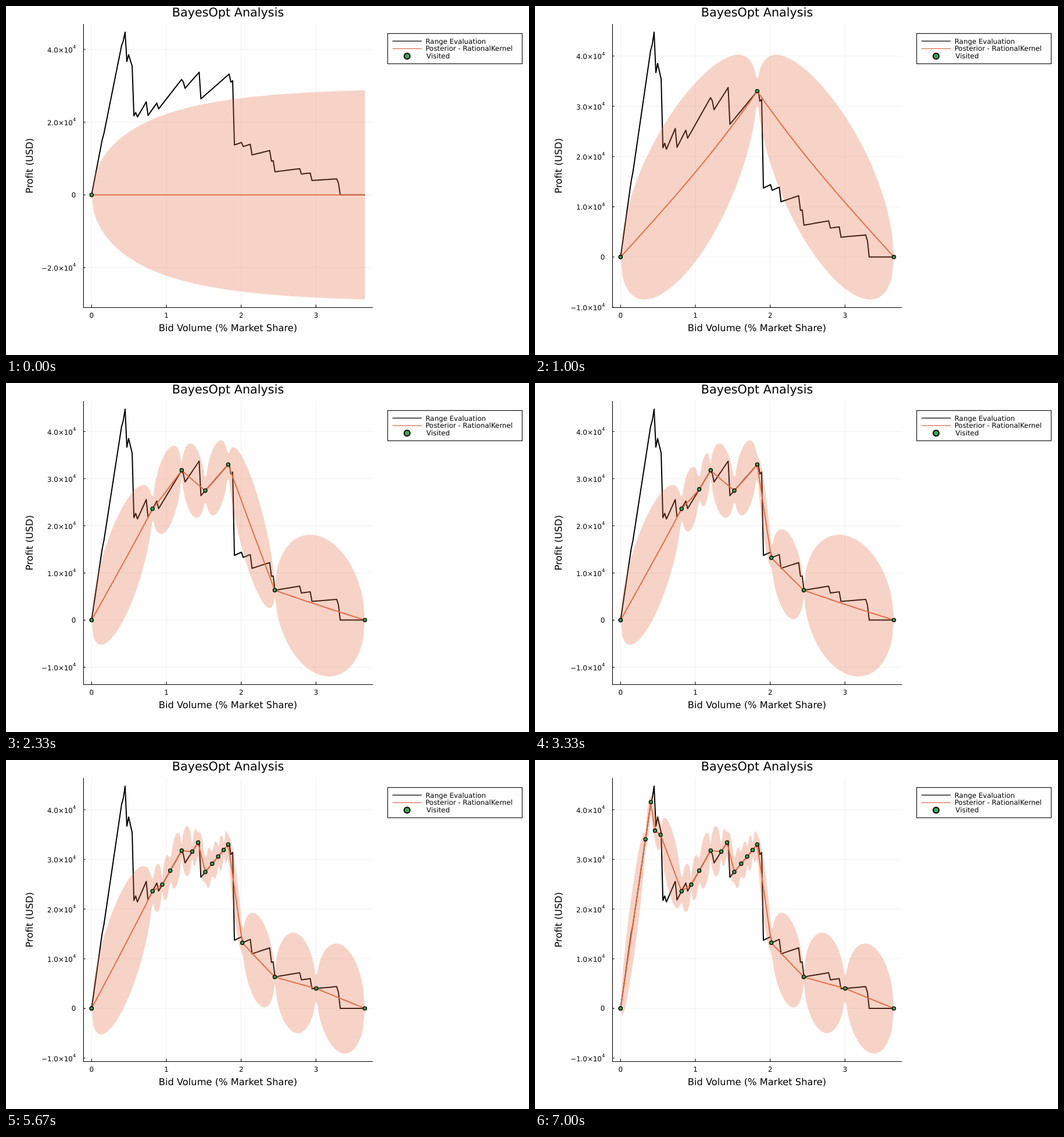
Recreate the animation shown at these times as an HTML page. Size 900 px wide and 600 px high, loop 7330 ms.

```html
<!DOCTYPE html>
<html lang="en">
<head>
<meta charset="utf-8">
<title>BayesOpt Analysis</title>
<style>
  html, body { margin: 0; width: 100%; height: 100%; overflow: hidden; background: #fff; }
  svg { display: block; width: 900px; height: 600px; }
  text { font: 11.86px "DejaVu Sans", sans-serif; fill: #000; text-rendering: geometricPrecision; }
  .title { font-size: 20.75px; }
  .label { font-size: 16.3px; }
  .mid { text-anchor: middle; }
  .end { text-anchor: end; }
  .sup { font-size: 8.3px; }
  .axis { fill: none; stroke: #000; stroke-width: 1.1; }
  .grid { fill: none; stroke: #000; stroke-opacity: .06; }
  .truth, .mean { fill: none; stroke: #000; stroke-width: 2; stroke-linejoin: round; }
  .mean { stroke: #e36f47; }
  .band { fill: #e36f47; fill-opacity: .3; }
  .dot { fill: #3ea44e; stroke: #000; stroke-width: 1.3; }
  .key { stroke-width: 1.2; }
</style>
</head>
<body>
<svg viewBox="0 0 900 600">
  <g id="plot"></g>
  <path class="axis" d="M133.4 31V518.5H631.4"/>
  <g id="xticks"></g>
  <text class="title mid" x="382" y="18.2">BayesOpt Analysis</text>
  <text class="label mid" x="382" y="559">Bid Volume (% Market Share)</text>
  <text class="label mid" transform="translate(45.8 274.7) rotate(-90)">Profit (USD)</text>
  <g id="legend">
    <rect class="axis" x="656.8" y="47.3" width="231.5" height="52"/>
    <path class="truth key" d="M665 60.4H715.5"/>
    <path class="mean key" d="M665 73.4H715.5"/>
    <circle class="dot" cx="690.2" cy="86.2" r="5" style="stroke-width:2"/>
    <text x="721.9" y="64.5">Range Evaluation</text>
    <text x="721.9" y="77.4">Posterior - RationalKernel</text>
    <text x="723.6" y="90.4">Visited</text>
  </g>
</svg>
<script>
const LEFT = 147.3, UNIT = 128.7, STEPS = 155, CELL = 470.3 / STEPS;
const TOP = 45, HEIGHT = 459.5, PEAK = 44.75;
const SPREAD = 29.455, LENGTH = 2.37 * UNIT / CELL;   // band amplitude, correlation length in cells
const LOOP = 7330;

// Price ladder: each price holds up to the given volume (in cells)
const ladder = [
  [6, 2.52], [17.5, 2.415], [19, 2.355], [21, 1.835], [22, 1.68], [23, 1.54], [25, .906],
  [31, .825], [37, .6825], [51.5, .622], [52, .598], [61, .553], [78, .426], [80, .3925],
  [85, .1695], [90, .1545], [101, .1208], [103, .091], [118, .061], [124, .0484],
  [139, .0316], [140, .0232], [STEPS, 0]
];
// Profit in thousands is volume times price
const profit = u => u * ladder.find(([last]) => u <= last)[1];

// Volumes in the order they are tried
const visits = [
  0, 0, STEPS, STEPS / 2, 51.1, 64.5, 34.6, 103.9, 85.5, 44.6, 0, 127.4,
  71.8, 57.1, 74.9, 68.4, 60.4, 40.1, 22.7, 17.2, 19.5, 14.1
].map(u => [u, profit(u)]);
const starts = visits.map((_, i) => Math.round(i * 100 / 3) * 10);

const cells = Array.from({ length: STEPS + 1 }, (_, i) => i);
const truth = cells.map(u => [u, profit(u)]);
const xOf = u => LEFT + u * CELL;

// Mean and band half-width at u, conditioned on the nearest samples
function posterior(u, seen) {
  const left = seen.findLast(p => p[0] <= u);
  const right = seen.find(p => p[0] > u);
  const a = (u - left[0]) / LENGTH;
  if (!right) return [left[1] * Math.exp(-a), SPREAD * Math.sqrt(1 - Math.exp(-2 * a))];
  const b = (right[0] - u) / LENGTH;
  const sa = Math.sinh(a), sb = Math.sinh(b), sum = Math.sinh(a + b);
  return [(left[1] * sb + right[1] * sa) / sum, SPREAD * Math.sqrt(2 * sa * sb / sum)];
}

function tickLabel(v, y) {
  if (!v) return `<text class="end" x="120.2" y="${y + 4.2}">0</text>`;
  const num = (v < 0 ? "−" : "") + Math.abs(v / 10).toFixed(1);
  return `<text class="end" x="120.2" y="${y + 5.3}">${num}×10<tspan class="sup" dy="-6.6">4</tspan></text>`;
}

function draw(step) {
  const shown = visits.slice(0, step + 1);
  const seen = [...shown].sort((p, q) => p[0] - q[0]);
  const fit = cells.map(u => [u, ...posterior(u, seen)]);
  const low = Math.min(...fit.map(([, m, w]) => m - w));
  const range = PEAK - low, scale = HEIGHT / range;
  const yOf = v => TOP + (PEAK - v) * scale;
  const path = pts => "M" + pts.map(([u, v]) => xOf(u).toFixed(2) + " " + yOf(v).toFixed(2)).join("L");

  const gap = range > 60 ? 20 : 10;
  let grid = "", ticks = "", labels = "";
  for (let v = -40; v <= 40; v += gap) {
    if (v < low - range * .03 - .05) continue;
    const y = yOf(v);
    grid += `M133 ${y}H631.4`;
    ticks += `M133 ${y}h3.6`;
    labels += tickLabel(v, y);
  }
  for (let i = 0; i < 4; i++) grid += `M${LEFT + i * UNIT} 31V518`;

  const upper = fit.map(([u, m, w]) => [u, m + w]);
  const lower = fit.map(([u, m, w]) => [u, m - w]).reverse();
  const dots = shown.map(([u, v]) => `<circle class="dot" cx="${xOf(u)}" cy="${yOf(v)}" r="3.05"/>`).join("");
  document.getElementById("plot").innerHTML =
    `<path class="grid" d="${grid}"/><path class="axis" d="${ticks}"/>${labels}` +
    `<path class="truth" d="${path(truth)}"/>` +
    `<path class="band" d="${path([...upper, ...lower])}Z"/>` +
    `<path class="mean" d="${path(fit)}"/>${dots}`;
}

document.getElementById("xticks").innerHTML = [0, 1, 2, 3].map(i => {
  const x = LEFT + i * UNIT;
  return `<path class="axis" d="M${x} 518v-4.5"/><text class="mid" x="${x}" y="536.4">${i}</text>`;
}).join("");

let current = -1;
const origin = performance.now();
function tick() {
  const t = (performance.now() - origin) % LOOP;
  const step = starts.findLastIndex(s => s <= t);
  if (step !== current) draw(current = step);
  requestAnimationFrame(tick);
}
tick();
</script>
</body>
</html>
```
